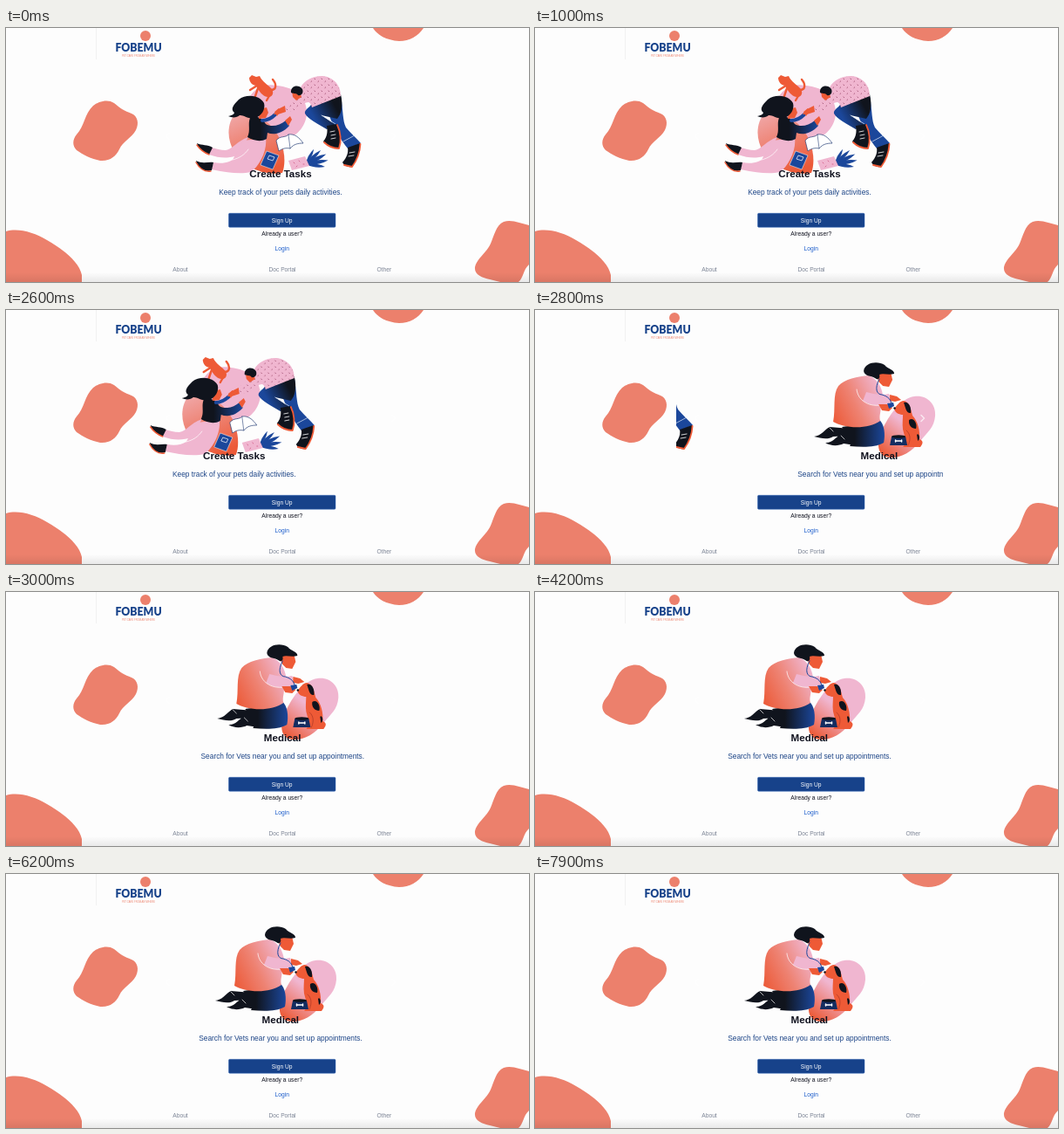
Write an HTML page that moves like this. It is 600x291 px and loops after 8 s.

```html
<!DOCTYPE html>
<html lang="en">
<head>
<meta charset="utf-8">
<title>Pet care</title>
<style>
  html, body { margin: 0; height: 100%; overflow: hidden; background: #fdfdfd; }
  svg { display: block; width: 100vw; height: 100vh; }
  text { font: 6.7px "Liberation Sans", Arial, sans-serif; text-anchor: middle; }
  .title { font-size: 11.6px; font-weight: bold; fill: #10121f; }
  .lead { font-size: 8.34px; fill: #1d4587; }
  .foot { fill: #7b8394; }
  .brand { font: 900 12.3px Lato, sans-serif; fill: #17428a; }
  .coral { fill: #ec806c; }
  .pink { fill: #f0b6d0; }
  .red { fill: #ee5a36; }
  .ink { fill: #10141d; }
  .blue { fill: #1b479b; }
  .line { fill: none; stroke-linecap: round; stroke-linejoin: round; }
</style>
</head>
<body>
<svg viewBox="0 0 600 291">
  <defs>
    <clipPath id="view"><path d="M162 40H468V205H162Z"/></clipPath>
    <linearGradient id="rose" x1=".2" y1="0" x2=".6" y2="1">
      <stop stop-color="#f0a6a6"/><stop offset="1" stop-color="#ec5a38"/>
    </linearGradient>
    <linearGradient id="coat" x1="0" y1=".8" x2="1" y2=".3">
      <stop stop-color="#ec5d3c"/><stop offset=".45" stop-color="#ee8272"/><stop offset="1" stop-color="#f0b6d0"/>
    </linearGradient>
    <linearGradient id="blush" x1=".8" y1=".2" x2=".2" y2="1">
      <stop offset=".4" stop-color="#f0b6d0"/><stop offset="1" stop-color="#ec5d3c"/>
    </linearGradient>
    <linearGradient id="night">
      <stop offset=".3" stop-color="#10141d"/><stop offset="1" stop-color="#1b479b"/>
    </linearGradient>
    <linearGradient id="thigh" x1="1" y1=".2" x2="0" y2=".7">
      <stop offset=".2" stop-color="#10141d"/><stop offset=".8" stop-color="#1b479b"/>
    </linearGradient>
    <linearGradient id="shade" x2="0" y2="1">
      <stop stop-opacity="0"/><stop offset="1" stop-opacity=".08"/>
    </linearGradient>
    <pattern id="dots" width="8" height="7" patternUnits="userSpaceOnUse">
      <path class="pink" d="M0 0H8V7H0Z"/>
      <path class="line" d="M2 2l.5 .6M6 5.5l.6 -.5" stroke="#8a3457" stroke-width=".8"/>
    </pattern>
    <path id="leaf" class="blue" d="M0 0Q13 -4.500 26 0Q13 4.500 0 0Z"/>
  </defs>

  <!-- backdrop -->
  <g class="coral">
    <path d="M100 89C106 84 117 81 124 86C131 92 136 95 144 98C151 101 153 109 149 117C144 126 134 130 130 139C126 147 119 153 108 152C98 150 88 145 81 140C76 135 76 128 81 122C90 113 90 98 100 89Z"/>
    <path d="M421 0C426 8 436 14 451 15C463 15 473 9 479 0Z"/>
    <path d="M0 233C14 229 32 234 47 243C66 254 84 268 87 283V291H0Z"/>
    <path d="M600 226C591 224 580 219 571 222C562 226 560 238 556 247C551 258 540 264 538 274C537 283 546 286 555 288L567 291H588C594 286 593 277 600 271Z"/>
  </g>
  <path d="M103.500 0V36" stroke="#f1f1f1"/>
  <circle cx="160" cy="9" r="6" class="coral"/>
  <text class="brand" x="152" y="27">FOBEMU</text>
  <text class="coral" x="152" y="33" style="font-size:2.700px">PET CARE FROM ANYWHERE</text>

  <g clip-path="url(#view)">
    <g id="tasks">
      <path class="pink" d="M277 86C281 70 295 63 311 66C332 68 346 80 345 99C343 116 330 128 313 128C292 128 274 108 277 86Z"/>
      <path fill="url(#rose)" d="M264 97C253 108 253 128 262 142C275 162 298 169 317 166C323 150 318 124 300 108Z"/>
      <!-- cat -->
      <path class="red" d="M279 57L282 54L287 56L291 55C294 62 301 65 305 70C308 75 305 80 300 79C294 78 290 72 287 66C283 66 279 62 279 57Z"/>
      <path class="line" d="M288 66L280 71M289 69L286 78M303 76L299 83M304 71C310 71 311 65 306 59" stroke="#ee5a36" stroke-width="2.400"/>
      <!-- woman -->
      <path class="pink" d="M278 125C264 130 260 139 252 140C246 140 241 138 236 137L233 145C246 150 257 149 266 146Z"/>
      <path class="pink" d="M272 129L298 126C300 140 291 158 281 165C268 168 250 165 236 162L238 154C248 156 255 154 260 151Z"/>
      <path class="line" d="M260 151C268 149 274 145 278 139" stroke="#fff" stroke-width=".7"/>
      <path class="ink" d="M219 132C225 135 231 133 237 137L233 145C227 142 221 139 219 132Z M218 152C225 156 232 153 238 154L236 163C228 166 220 160 218 152Z"/>
      <path class="line" d="M219 134C223 140 228 143 233 145M218 154C222 161 228 165 235 164" stroke="#ee5a36" stroke-width="1.500"/>
      <path fill="url(#night)" d="M280 103C287 99 294 103 298 110C304 114 314 112 321 106L325 112C317 121 307 123 300 120L299 127C292 131 284 129 277 125C281 117 277 110 280 103Z"/>
      <path class="line" d="M294 106C300 106 305 103 309 99" stroke="#1b479b" stroke-width="4"/>
      <path class="red" d="M308 96L313 92L315 95L311 101Z M320 106L326 101L328 105L324 112Z M291 93L299 91L301 97L298 103L290 104Z"/>
      <path class="ink" d="M262 97C257 93 261 88 267 82C276 75 291 77 296 86C298 93 293 101 286 103C278 105 272 99 268 100C265 103 259 103 255 101C258 100 261 100 262 97Z"/>
      <!-- man -->
      <path class="blue" d="M384 78C387 95 386 106 390 114C396 121 402 126 407 132L392 138C384 128 374 112 368 92Z"/>
      <path fill="url(#thigh)" d="M350 88L384 76C387 89 385 98 380 104L362 100L378 111L368 116C358 110 346 104 343 98C342 94 347 92 350 88Z"/>
      <path class="line" d="M362 100L378 110M387 130L400 123" stroke="#dce5f5" stroke-width=".7"/>
      <path class="ink" d="M368 112L380 110C384 118 385 130 382 138C375 139 367 134 364 130C369 124 369 118 368 112Z M392 137L406 132C407 140 403 150 397 159C393 160 388 158 386 154C391 148 393 143 392 137Z"/>
      <path class="line" d="M380 111C384 119 385 130 382 138C376 138 369 135 365 131M406.500 133C406 142 403 151 397 159L388 157" stroke="#ee5a36" stroke-width="1.800"/>
      <path class="line" d="M372 119l5 -1M373 123l5 -1M373 127l5 -1M394 143l6 -1M393 147l6 -1" stroke="#fff" stroke-width=".8"/>
      <path fill="url(#dots)" d="M338 68C344 57 360 52 371 57C380 61 384 69 384 78L351 91C349 84 346 84 342 87C336 92 329 96 321 96L319 89C330 84 334 75 338 68Z"/>
      <path class="red" d="M320 89L312 93L307 99L312 99L321 96Z M328 72L337 73L339 79L333 83L329 79Z"/>
      <path class="ink" d="M327 74C326 66 336 64 340 70C342 75 338 78 335 77C333 74 330 76 327 74Z"/>
      <!-- books and plant -->
      <path d="M310 129C314 123 321 126 324 122C331 121 336 125 341 132C335 132 330 133 326 138C321 137 317 138 313 141Z" fill="#fff" stroke="#253d75" stroke-width=".7"/>
      <path class="line" d="M324 122L326 138" stroke="#253d75" stroke-width=".6"/>
      <path d="M299 141L313 146L306 162L292 157Z" class="blue" stroke="#fff" stroke-width=".5"/>
      <path d="M302 146L308 148L306 152L300 150Z" fill="none" stroke="#fff" stroke-width=".7"/>
      <g transform="translate(344 156)">
        <use href="#leaf" transform="rotate(-62) scale(.75)"/>
        <use href="#leaf" transform="rotate(-43) scale(.9)"/>
        <use href="#leaf" transform="rotate(-26)"/>
        <use href="#leaf" transform="rotate(-10)"/>
        <use href="#leaf" transform="rotate(8) scale(.85)"/>
      </g>
      <path class="pink" d="M324 152L343 147L348 158L328 163Z"/>
      <path class="line" d="M330 154l1 1M336 152l1 1M333 159l1 -1M341 156l1 0" stroke="#d66891"/>
      <text class="title" x="315" y="171">Create Tasks</text>
      <text class="lead" x="315" y="191">Keep track of your pets daily activities.</text>
    </g>

    <g id="medical">
      <path fill="url(#blush)" d="M355 99C370 97 380 108 379 121C378 135 370 140 362 150C350 165 335 172 322 168C312 164 312 150 318 138C326 120 340 101 355 99Z"/>
      <!-- vet -->
      <path class="ink" d="M240 145C249 144 252 137 258 134L282 136L280 144L262 145C256 149 248 147 240 145Z M253 152C260 153 265 146 271 142L296 137L294 156L274 153C268 156 259 156 253 152Z"/>
      <path fill="url(#night)" d="M272 134C286 132 300 131 314 125C321 130 322 143 320 152C310 158 294 157 281 156C285 150 279 144 272 134Z"/>
      <path class="line" d="M258 135l4 4M271 144l4 4" stroke="#fff" stroke-width=".7"/>
      <path fill="url(#coat)" d="M268 87C275 79 290 76 303 75C313 79 318 89 319 98L316 108C318 116 314 120 316 127C301 138 273 135 262 128C265 113 261 97 268 87Z"/>
      <path class="pink" d="M300 94C308 96 315 98 326 96L329 105C319 112 305 110 296 104Z"/>
      <path class="line" d="M289 91C290 103 302 111 316 109" stroke="#fff" stroke-width=".7"/>
      <path class="red" d="M327 97L335 99L340 103L333 105L327 104Z M314 108L324 108L330 112L326 116L318 115Z M311 71L328 71L330 80L326 88L319 87L314 82Z"/>
      <path class="ink" d="M297 70C298 60 313 58 321 63C325 68 332 68 332 73C326 75 319 72 315 74C316 78 314 81 310 78C305 75 298 76 297 70Z"/>
      <path class="line" d="M315 79C309 90 312 97 318 97C325 99 329 103 329 109" stroke="#1b479b"/>
      <path class="blue" d="M324 107L331 106L332 110L326 113Z"/>
      <!-- dog -->
      <path class="red" d="M332 113C335 110 338 104 343 104C349 105 351 113 353 121C359 127 362 139 361 148C366 150 365 153 362 157H342L346 152L342 137C341 130 342 125 342 120C338 120 333 118 332 113Z"/>
      <path class="ink" d="M343 106C349 104 352 112 351 118C346 119 345 112 343 106Z M349 126C354 122 359 130 357 136C352 136 348 132 349 126Z M358 143C360 140 363 148 359 150Z"/>
      <circle class="ink" cx="332.500" cy="112.500" r="1.200"/>
      <path class="line" d="M346 138C352 143 350 151 348 155" stroke="#a93726" stroke-width=".7"/>
      <path d="M329 145H345L347 155H327Z" fill="#142d61"/>
      <ellipse cx="337" cy="145" rx="8" ry="1.700" fill="#10141d"/>
      <path class="line" d="M334 150H340M333.500 149v2M340.500 149v2" stroke="#fff" stroke-width="1.500"/>
      <text class="title" x="314.800" y="171">Medical</text>
      <text class="lead" x="315" y="191">Search for Vets near you and set up appointments.</text>
    </g>
    <path class="line" d="M187 120.500L183.500 124L187 127.500M443 120.500L446.500 124L443 127.500" stroke="#fff" stroke-width="1.400" opacity=".7"/>
  </g>

  <rect x="255.500" y="212.300" width="122.500" height="16" rx="1.200" fill="#17428a" stroke="#2c60b0" stroke-width=".5"/>
  <text x="316.700" y="222.600" fill="#fff">Sign Up</text>
  <text x="316.700" y="238" fill="#10121f">Already a user?</text>
  <text x="316.700" y="255" fill="#1a5ccb">Login</text>
  <text class="foot" x="200" y="279">About</text>
  <text class="foot" x="317" y="279">Doc Portal</text>
  <text class="foot" x="433.800" y="279">Other</text>
  <rect y="280" width="600" height="11" fill="url(#shade)"/>
</svg>
<script>
  const LOOP = 8000, START = 2370, LENGTH = 700, WIDTH = 306;
  const tasks = document.getElementById("tasks");
  const medical = document.getElementById("medical");

  function ease(x) {
    const a = x ** 2.2, b = (1 - x) ** 2.2;
    return a / (a + b);
  }

  function draw() {
    const time = performance.now() % LOOP;
    const x = Math.min(1, Math.max(0, (time - START) / LENGTH));
    const shift = WIDTH * ease(x);
    tasks.setAttribute("transform", `translate(${-shift})`);
    medical.setAttribute("transform", `translate(${WIDTH - shift})`);
    requestAnimationFrame(draw);
  }
  draw();
</script>
</body>
</html>
```
